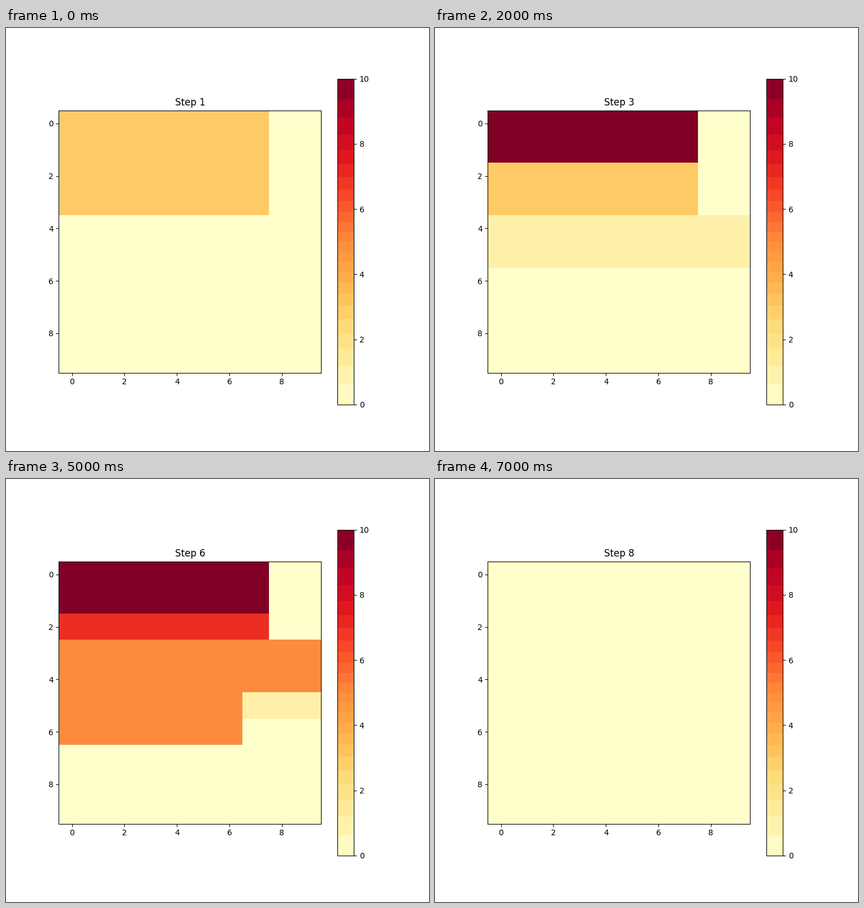
Animation, 748 px wide and 748 px high, one loop 8 s. Source, as a matplotlib script:

```python
import numpy as np
import matplotlib.pyplot as plt
from matplotlib.animation import FuncAnimation

SIZE, DPI = 748, 100
N, TOP, BANDS = 10, 10, 24

# Each step paints one block: first row, end row, end column, value
STEPS = [
    (0, 4, 8, 3),
    (4, 6, 10, 1),
    (0, 2, 8, 10),
    (2, 3, 8, 7),
    (3, 5, 10, 5),
    (5, 7, 7, 5),
    (2, 10, 8, 7),
    (0, 10, 10, 0),
]


def grid_at(step):
    grid = np.zeros((N, N))
    for r0, r1, c1, value in STEPS[:step + 1]:
        grid[r0:r1, :c1] = value
    return grid


def add_axes(x, y, w, h):
    """Axes placed in pixels from the lower left corner."""
    return fig.add_axes([v / SIZE for v in (x, y, w, h)])


def band_edges():
    """Limits of the flat colour bands, closer together in the middle."""
    t = np.linspace(-1, 1, BANDS + 1)
    return TOP / 2 * (1 + 0.72 * t + 0.28 * t ** 3)


fig = plt.figure(figsize=(SIZE / DPI, SIZE / DPI), dpi=DPI)
ax = add_axes(93.4, 138.4, 464.05, 464.05)
bar_ax = add_axes(586.25, 82.28, 28.8, 575.96)

style = dict(cmap="YlOrRd", vmin=0, vmax=TOP)
image = ax.imshow(grid_at(0), interpolation="nearest", **style)
title = ax.set_title("Step 1")

fig.colorbar(image, cax=bar_ax)
edges = band_edges()
mids = (edges[:-1] + edges[1:]) / 2
bar_ax.pcolormesh([0, 1], edges, mids[:, None], **style)


def update(step):
    image.set_data(grid_at(step))
    title.set_text(f"Step {step + 1}")
    return image, title


anim = FuncAnimation(fig, update, frames=len(STEPS), interval=1000,
                     repeat=True, repeat_delay=0, blit=False)
plt.show()
```
